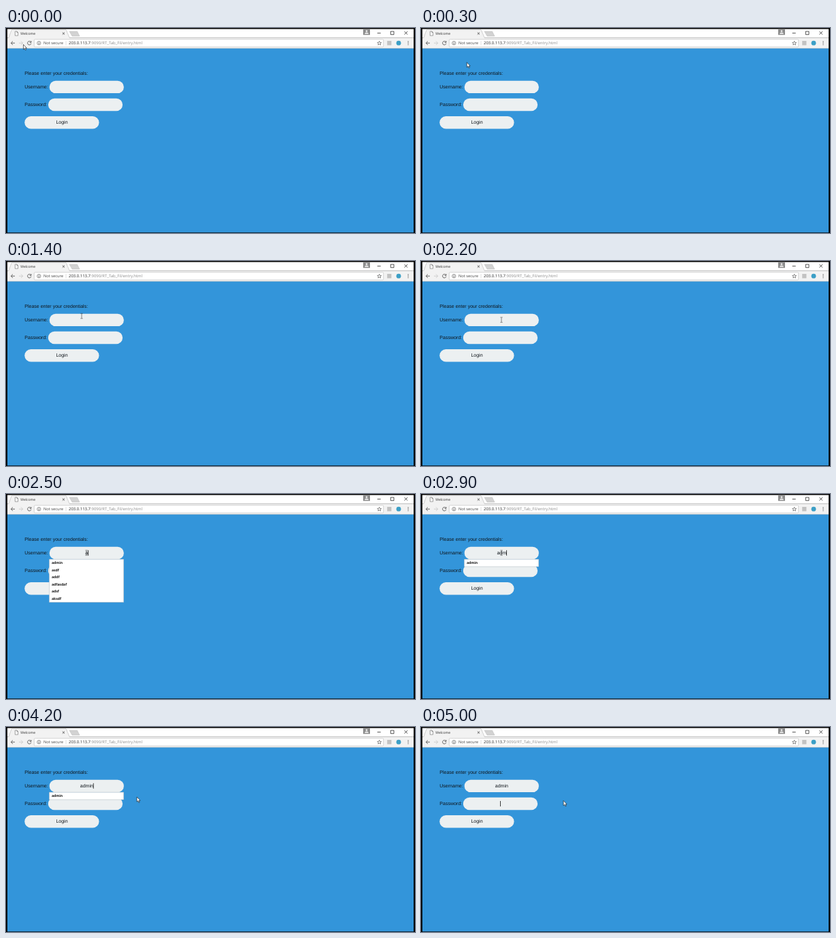
Animation, 600 px wide and 302 px high, one loop 5100 ms. Source, as an HTML page:

```html
<!DOCTYPE html>
<html lang="en">
<head>
<meta charset="utf-8">
<title>Login form</title>
<style>
  html, body { margin: 0; width: 100%; height: 100%; overflow: hidden; background: #000; }
  svg { display: block; width: 100%; height: 100%; }
  .ui { font-family: "Open Sans", "Noto Sans", sans-serif; }
  .page { font: 7.03px "Liberation Sans", Arial, sans-serif; fill: #10161c; }
  .row { font: bold 5.1px "Open Sans", "Noto Sans", sans-serif; fill: #111; }
  .field { fill: #ecf0f1; }
  .line { fill: none; stroke: #444; stroke-width: .8; }
  .mid { text-anchor: middle; }
</style>
</head>
<body>
<svg viewBox="0 0 600 302" text-rendering="geometricPrecision">
  <rect width="600" height="302" fill="#000"/>
  <rect x="2" y="1.5" width="596" height="13" fill="#fff"/>

  <!-- tab strip -->
  <path d="M93 5H104.5L108 12H97Z" fill="#d2d2d2" stroke="#b8b8b8" stroke-width=".5"/>
  <path d="M2 14.2H4L8 3.2Q8.4 2.3 9.4 2.3H87Q88 2.3 88.5 3.2L93 14.2H598V30H2Z" fill="#f2f2f2"/>
  <path d="M2 14.2H4L8 3.2Q8.4 2.3 9.4 2.3H87Q88 2.3 88.5 3.2L93 14.2H598" fill="none" stroke="#b4b4b4" stroke-width=".6"/>
  <path d="M13.3 5H16L17.6 6.6V11.2H13.3ZM16 5V6.6H17.6" fill="#fff" stroke="#666" stroke-width=".6"/>
  <text class="ui" x="21.3" y="10.1" font-size="5.1" fill="#333">Welcome</text>
  <path class="line" d="M82.8 6.5L86 9.7M86 6.5L82.8 9.7"/>

  <!-- window controls -->
  <rect x="524" y="1.5" width="10" height="8.7" fill="#8c8c8c"/>
  <circle cx="529" cy="4.6" r="1.4" fill="#eee"/>
  <path d="M526.2 8.8Q526.2 6.4 529 6.4T531.8 8.8Z" fill="#eee"/>
  <path d="M544.7 7.5H549.7M564.3 5H569V9.7H564.3ZM584.5 5L589 9.7M589 5L584.5 9.7" fill="none" stroke="#111" stroke-width=".7"/>

  <!-- toolbar -->
  <path class="line" d="M13 22.2H7.4M10 19.5L7.3 22.2L10 24.9"/>
  <path class="line" style="stroke:#c6c6c6" d="M19 22.2H24.6M22 19.5L24.7 22.2L22 24.9"/>
  <path class="line" d="M36.4 20.5A2.7 2.7 0 1 0 36.9 22.8M36.9 19V21.3H34.6"/>
  <rect x="41.3" y="16.7" width="512.4" height="11.2" rx="1.2" fill="#fff" stroke="#c4c4c4" stroke-width=".7"/>
  <circle class="line" cx="48.3" cy="22.2" r="2.6" style="stroke-width:.6"/>
  <path class="line" d="M48.3 20.6V21.3M48.3 21.8V23.8"/>
  <text class="ui" x="55" y="24.3" font-size="5.75" fill="#444">Not secure</text>
  <path d="M88 19V25.5" stroke="#ccc" stroke-width=".6"/>
  <text class="ui" x="92" y="24.3" font-size="5.95" fill="#8a8a8a"><tspan fill="#222">203.0.113.7</tspan>:9090/RT_Tab_Fil/entry.html</text>
  <path class="line" style="stroke-width:.6" d="M547.7 19.3L548.5 21.3L550.7 21.5L549 22.9L549.6 25L547.7 23.8L545.8 25L546.4 22.9L544.7 21.5L546.9 21.3Z"/>
  <rect x="559.2" y="19" width="6.2" height="6.4" fill="#c2c2c2"/>
  <circle cx="576" cy="22.2" r="3.4" fill="#3c9fc6"/>
  <g fill="#555"><circle cx="590" cy="20" r=".7"/><circle cx="590" cy="22.3" r=".7"/><circle cx="590" cy="24.6" r=".7"/></g>

  <!-- page -->
  <rect x="2" y="30" width="596" height="271.3" fill="#3395da"/>
  <path d="M2 30H598" stroke="#a9b3bb" stroke-width=".6"/>
  <g class="page">
    <text x="27.3" y="69">Please enter your credentials:</text>
    <text x="27.3" y="89.2">Username:</text>
    <text x="27.3" y="115.2">Password:</text>
    <rect class="field" x="63.7" y="77.7" width="109.2" height="18.4" rx="9.2"/>
    <rect class="field" x="61.9" y="103.8" width="109.2" height="18.4" rx="9.2"/>
    <rect class="field" x="27.3" y="130" width="109.2" height="18.4" rx="9.2"/>
    <text class="mid" x="82" y="141.3">Login</text>
    <text class="mid" id="username" x="118.3" y="89.2"></text>
  </g>
  <g id="popup">
    <rect id="popupBox" x="63.4" y="96.1" width="109.3" fill="#fff" stroke="#a8b4bc" stroke-width=".5"/>
    <g id="rows"></g>
  </g>
  <path id="caret" d="M0 -4V4" stroke="#111" stroke-width=".8"/>
  <path id="arrow" d="M0 0V7.2L1.7 5.7L2.9 8.3L4 7.8L2.9 5.3H5Z" fill="#fff" stroke="#111" stroke-width=".6"/>
  <path id="beam" d="M-1.6 -3.7H-.5L0 -3.3L.5 -3.7H1.6M0 -3.3V3.3M-1.6 3.7H-.5L0 3.3L.5 3.7H1.6" fill="none" stroke="#333" stroke-width=".6"/>
</svg>
<script>
const LOOP = 5100, STEP = 100, ROW = 10.5;
const el = id => document.getElementById(id);
const SUGGESTIONS = ["admin", "asdf", "addf", "adfasdaf", "adsf", "aksdf"];

// time, x, y of the pointer
const POINTER = [
  [0, 25.5, 24.3], [600, 109, 77], [1000, 109, 77], [1200, 117, 86], [1400, 111, 81],
  [1500, 111, 81], [1600, 117, 100], [1700, 124, 123], [1800, 118, 86.7], [3700, 118, 86.7],
  [3900, 130, 88], [4200, 192, 103], [4300, 206, 108], [4400, 209, 108.5], [LOOP, 209, 108.5]
];
// time, typed text, text the suggestions are filtered by
const TYPING = [
  [0, "", ""], [2500, "a", "a"], [2700, "ad", "a"], [2800, "ad", "ad"],
  [2900, "adm", "adm"], [3000, "admi", "adm"], [3200, "admin", "admin"]
];

function pointerAt(t) {
  const i = POINTER.findIndex(key => key[0] > t);
  const [t0, x0, y0] = POINTER[i - 1], [t1, x1, y1] = POINTER[i];
  const p = (t - t0) / (t1 - t0);
  return [x0 + (x1 - x0) * p, y0 + (y1 - y0) * p];
}

const within = (t, from, to) => t >= from && t < to;
const place = (node, x, y) => node.setAttribute("transform", `translate(${x} ${y})`);
const show = (node, on) => node.setAttribute("visibility", on ? "visible" : "hidden");

function drawPopup(t, prefix) {
  const matches = SUGGESTIONS.filter(word => word.startsWith(prefix));
  el("popup").setAttribute("opacity", !prefix || t >= 4900 ? 0 : t >= 4800 ? .5 : 1);
  el("popupBox").setAttribute("height", matches.length * ROW + .4);
  el("rows").innerHTML = matches
    .map((word, i) => `<text class="row" x="67" y="${103.2 + i * ROW}">${word}</text>`).join("");
}

function drawCaret(t) {
  const inPassword = t >= 4800;
  const on = within(t, 1800, 2200) || within(t, 2500, 3600) || within(t, 4100, 4700) || inPassword;
  const end = 118.3 + el("username").getComputedTextLength() / 2 + .4;
  show(el("caret"), on);
  place(el("caret"), inPassword ? 116.5 : end, inPassword ? 113 : 86.8);
}

function drawPointer(t) {
  const [x, y] = pointerAt(t);
  const overUsername = within(x, 63.7, 172.9) && within(y, 77.7, 96.1);
  const overPassword = within(x, 61.9, 171.1) && within(y, 103.8, 122.2);
  const popupOpen = within(t, 2500, 4800);
  const beam = overUsername || (overPassword && !popupOpen);
  show(el("beam"), beam);
  show(el("arrow"), !beam);
  place(el(beam ? "beam" : "arrow"), x, y);
}

function render(t) {
  const [, text, prefix] = TYPING.filter(key => key[0] <= t).pop();
  el("username").textContent = text;
  drawPopup(t, prefix);
  drawCaret(t);
  drawPointer(t);
}

const start = performance.now();
let last = -1;
function tick() {
  const elapsed = (performance.now() - start) % LOOP;
  const t = Math.floor(elapsed / STEP) * STEP;
  if (t !== last) render(last = t);
  requestAnimationFrame(tick);
}
tick();
</script>
</body>
</html>
```
